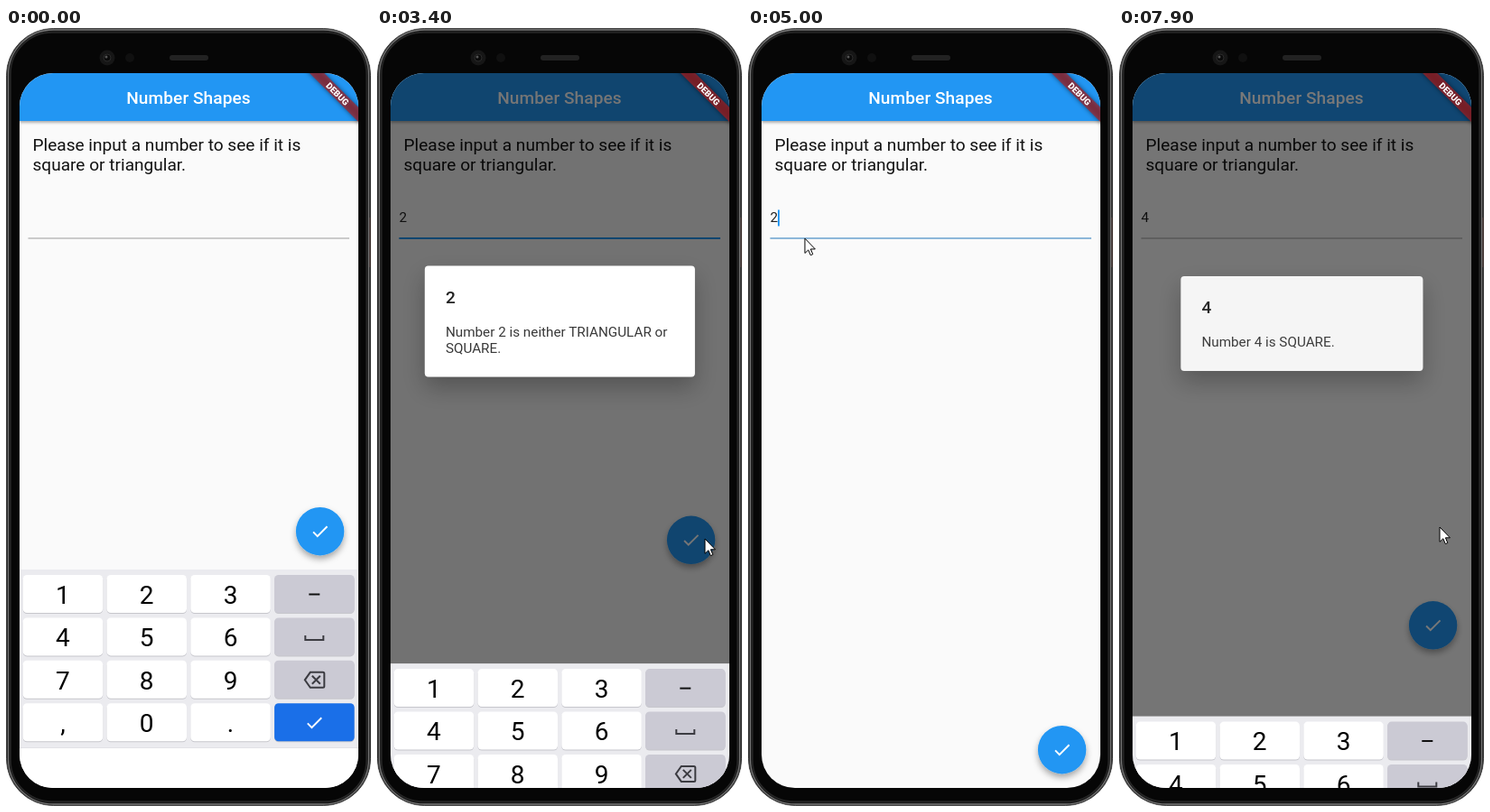
These frames come from a looping animation (404x862 px, 8 s). An HTML page:

```html
<!DOCTYPE html>
<html lang="en">
<head>
<meta charset="utf-8">
<title>Number Shapes</title>
<style>
  html, body { margin: 0; width: 100%; height: 100%; overflow: hidden; background: #fff; }
  svg { display: block; width: 404px; height: 862px; font-family: Roboto, sans-serif; }
  .ink { fill: rgba(0, 0, 0, .87); }
  .mid { text-anchor: middle; }
  .icon { fill: none; stroke-width: 2; }
  #prompt { font-size: 19.08px; fill: rgba(0, 0, 0, .93); }
  .small { font-size: 15.26px; }
  .head { font-size: 19.08px; font-weight: 500; }
  #cardLine1, #cardLine2 { fill: rgba(0, 0, 0, .78); }
</style>
</head>
<body>
<svg viewBox="0 0 404 862">
  <defs>
    <clipPath id="screen"><rect x="15" y="50" width="375" height="792" rx="37"/></clipPath>
    <filter id="barShadow" y="-20%" height="150%"><feDropShadow dx="0" dy="2" stdDeviation="1.8" flood-opacity=".3"/></filter>
    <filter id="fabShadow" x="-40%" y="-40%" width="180%" height="180%"><feDropShadow dx="0" dy="4" stdDeviation="3.5" flood-opacity=".34"/></filter>
    <filter id="cardShadow" x="-30%" y="-50%" width="160%" height="220%"><feDropShadow dx="0" dy="12" stdDeviation="13" flood-opacity=".26"/></filter>
    <filter id="bannerShadow" x="-20%" y="-100%" width="140%" height="300%"><feGaussianBlur stdDeviation="2.6"/></filter>
    <path id="check" d="M9 16.17 4.83 12l-1.42 1.41L9 19 21 7l-1.41-1.41z" transform="scale(.954) translate(-12 -12)"/>
  </defs>

  <rect x=".5" y=".5" width="403" height="861" rx="52" fill="#1a1a1a" stroke="#4a4a4a"/>
  <rect x="2.5" y="2" width="399" height="858" rx="50" fill="none" stroke="#777" stroke-width="1.3"/>
  <rect x="5" y="5" width="394" height="852" rx="46" fill="#060606" stroke="#262626" stroke-width="1.5"/>
  <path d="M403 210v55" stroke="#5a4440"/>
  <circle cx="112" cy="33" r="8.5" fill="#161616"/>
  <circle cx="112" cy="33" r="4" fill="#0a0a0a" stroke="#2a2a2a"/>
  <circle cx="111" cy="32" r="1.5" fill="#555"/>
  <circle cx="137" cy="33" r="5" fill="#101010"/>
  <rect x="181" y="30" width="43" height="6" rx="3" fill="#222"/>

  <g clip-path="url(#screen)">
    <rect x="15" y="50" width="375" height="792" fill="#fafafa"/>
    <rect x="15" y="50" width="375" height="53" fill="#2196f3" filter="url(#barShadow)"/>
    <text class="head mid" x="202" y="83.5" fill="#fff" letter-spacing=".08">Number Shapes</text>
    <g id="prompt">
      <text x="29.5" y="136">Please input a number to see if it is</text>
      <text x="29.5" y="158.4">square or triangular.</text>
    </g>
    <text id="entry" class="ink small" x="24.5" y="215.2"></text>
    <path d="M24.5 233H380" stroke="#000" stroke-opacity=".38"/>
    <path id="focusLine" d="M24.5 233H380" stroke="#2196f3" stroke-width="2"/>
    <rect id="caret" y="201.5" width="1.9" height="18" fill="#2196f3"/>
    <path id="handle" d="M32.7 219l7.4 7.4a10.5 10.5 0 1 1-14.8 0z" fill="#2196f3"/>
    <g id="fab">
      <circle r="26.7" fill="#2196f3" filter="url(#fabShadow)"/>
      <use href="#check" fill="#fff"/>
    </g>
    <rect id="barrier" x="15" y="50" width="375" height="792"/>
    <g id="dialog">
      <rect id="card" rx="4" fill="#fff" filter="url(#cardShadow)"/>
      <text id="cardTitle" class="ink head" x="23" y="41"></text>
      <text id="cardLine1" class="small" x="23" y="78"></text>
      <text id="cardLine2" class="small" x="23" y="96"></text>
    </g>
    <g id="keyboard">
      <rect x="15" y="600" width="375" height="197" fill="#ebebef"/>
      <rect x="15" y="797" width="375" height="46" fill="#fff"/>
      <path d="M15 797.5h375" stroke="#e2e2e6"/>
    </g>
    <g transform="translate(390 50) rotate(45)">
      <rect x="-60" y="26.7" width="120" height="11.5" opacity=".5" filter="url(#bannerShadow)"/>
      <rect x="-60" y="26.7" width="120" height="11.5" fill="#b71c1c" fill-opacity=".63"/>
      <text class="mid" y="36" fill="#fff" font-size="9.73" font-weight="900">DEBUG</text>
    </g>
  </g>
  <path id="pointer" d="M0 0V16.3L3.8 12.8 6.3 18.6 8.8 17.5 6.4 11.8H11.4Z" fill="#fff" stroke="#000"/>
</svg>
<script>
const LOOP = 8000, KEYBOARD_HEIGHT = 242;
const el = Object.fromEntries([...document.querySelectorAll('[id]')].map(node => [node.id, node]));
const clamp = v => Math.max(0, Math.min(1, v));
const ramp = (t, start, duration) => clamp((t - start) / duration);
const smooth = p => p * p * (3 - 2 * p);
const show = (node, visible) => node.setAttribute('display', visible ? 'inline' : 'none');
const move = (node, x, y) => node.setAttribute('transform', `translate(${x} ${y})`);

// Pointer stops: time, x, y
const pointerStops = [
  [500, 412, 430], [1300, 148, 213], [2650, 148, 213], [3050, 363, 566], [3750, 363, 566],
  [4350, 66, 256], [4900, 66, 256], [5100, 60, 211], [6660, 60, 211], [7440, 355, 553]
];
const entries = [[0, ''], [2500, '2'], [5800, ''], [6200, '4']];
const caretResets = [200, 2500, 4830, 5800, 6200];
const dialogs = [
  { open: 3180, close: 4823, width: 299, height: 123, title: '2',
    lines: ['Number 2 is neither TRIANGULAR or', 'SQUARE.'] },
  { open: 7790, close: 9000, width: 268, height: 105, title: '4',
    lines: ['Number 4 is SQUARE.', ''] }
];

function buildKeyboard() {
  const icons = {
    dash: '<path d="M-6 0H6"/>',
    space: '<path d="M-10 -2V3H10V-2"/>',
    erase: '<path d="M-4.5 -8.5H9.5Q11 -8.5 11 -7V7Q11 8.5 9.5 8.5H-4.5L-10.5 0ZM-2.5 -4.5L6.5 4.5M6.5 -4.5L-2.5 4.5"/>'
  };
  const rows = [['1', '2', '3', 'dash'], ['4', '5', '6', 'space'], ['7', '8', '9', 'erase'], [',', '0', '.', 'enter']];
  let html = '';
  rows.forEach((row, r) => row.forEach((key, c) => {
    const x = 18.7 + c * 92.8, y = 606 + r * 47.4;
    const fill = c < 3 ? '#fff' : key === 'enter' ? '#1a6fe8' : '#cbcad4';
    const rect = (dy, color) => `<rect x="${x}" y="${y + dy}" width="88.5" height="42" rx="4.5" fill="${color}"/>`;
    html += rect(1, '#c6c6cc') + rect(0, fill);
    const place = `transform="translate(${x + 44.2} ${y + 21.5})"`;
    if (c < 3) html += `<text class="mid" ${place} y="10.3" font-size="28">${key}</text>`;
    else if (key === 'enter') html += `<use href="#check" ${place} fill="#fff"/>`;
    else html += `<g class="icon" stroke="${key === 'dash' ? '#111' : '#3c3c42'}" ${place}>${icons[key]}</g>`;
  }));
  el.keyboard.insertAdjacentHTML('beforeend', html);
}

// Share of the keyboard that has slid away, from 0 to 1
function keyboardHidden(t, lag1 = 0, lag2 = 0) {
  return smooth(ramp(t, 3265 + lag1, 300)) - smooth(ramp(t, 5120 + lag2, 300)) + smooth(ramp(t, 7716 + lag2, 300));
}

function pointerAt(t) {
  const next = pointerStops.findIndex(stop => stop[0] > t);
  if (next < 1) return (next ? pointerStops.at(-1) : pointerStops[0]).slice(1);
  const [t0, x0, y0] = pointerStops[next - 1], [t1, x1, y1] = pointerStops[next];
  const p = smooth(ramp(t, t0, t1 - t0));
  return [x0 + (x1 - x0) * p, y0 + (y1 - y0) * p];
}

function drawDialog(t) {
  const dialog = dialogs.find(d => t >= d.open && t < d.close + 150);
  show(el.dialog, dialog);
  show(el.barrier, dialog);
  if (!dialog) return;
  const shown = Math.min(ramp(t, dialog.open, 150), 1 - ramp(t, dialog.close, 150));
  el.barrier.setAttribute('opacity', .54 * (1 - (1 - shown) ** 3));
  el.dialog.setAttribute('opacity', 1 - (1 - shown) ** 2);
  const { width, height, title, lines } = dialog;
  move(el.dialog, 202.4 - width / 2, 325 - height / 2 + 121 * keyboardHidden(t, 160, 160));
  el.card.setAttribute('width', width);
  el.card.setAttribute('height', height);
  el.cardTitle.textContent = title;
  [el.cardLine1.textContent, el.cardLine2.textContent] = lines;
}

function drawField(t) {
  const text = entries.findLast(entry => entry[0] <= t)[1];
  el.entry.textContent = text;
  const focus = ramp(t, 50, 200) - ramp(t, 3420, 180) + ramp(t, 4930, 200) - ramp(t, 7700, 180);
  el.focusLine.setAttribute('opacity', focus);
  const reset = caretResets.findLast(time => time <= t);
  const focused = (t < 3400 || t >= 4830) && t < 7700;
  show(el.caret, reset !== undefined && focused && (t - reset) % 1000 < 500);
  el.caret.setAttribute('x', text ? 33 : 24.5);
  show(el.handle, t >= 5150 && t < 5800);
}

function draw(t) {
  drawField(t);
  move(el.fab, 347.6, 557.7 + KEYBOARD_HEIGHT * keyboardHidden(t, 100, 49));
  drawDialog(t);
  move(el.keyboard, 0, KEYBOARD_HEIGHT * keyboardHidden(t));
  move(el.pointer, ...pointerAt(t));
}

buildKeyboard();
const start = performance.now();
function tick() {
  draw((performance.now() - start) % LOOP);
  requestAnimationFrame(tick);
}
draw(0);
requestAnimationFrame(tick);
</script>
</body>
</html>
```
